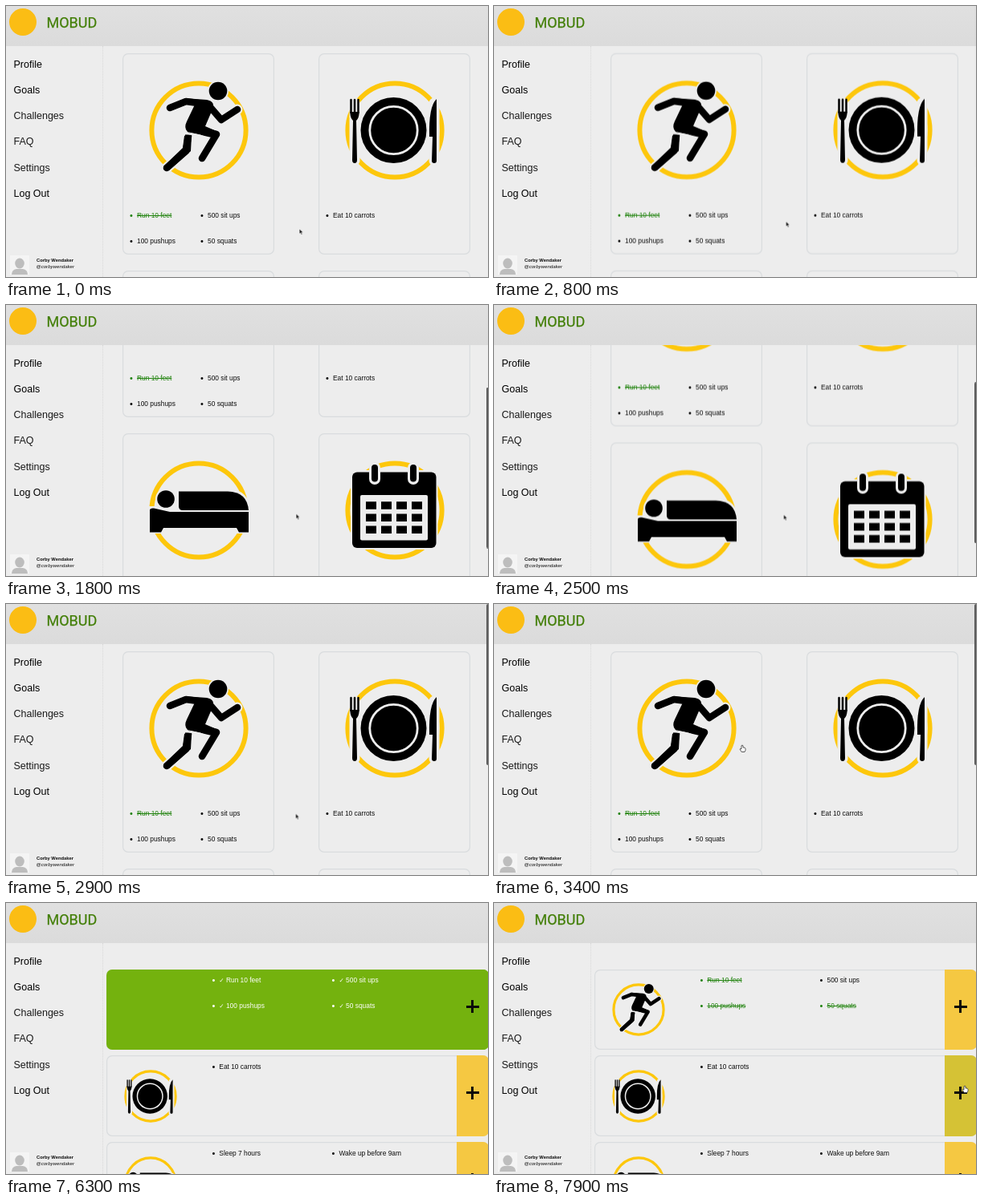
Animation, 600 px wide and 338 px high, one loop 8000 ms. Source, as an HTML page:

```html
<!DOCTYPE html>
<html lang="en">
<head>
<meta charset="utf-8">
<title>Goals</title>
<style>
  :root { --bg: #ededed; --ink: #0d0d0d; --done: #1f820c; --gold: #f5c842; --green: #74b20e; }
  html, body { margin: 0; width: 100%; height: 100%; overflow: hidden; background: var(--bg); }
  body { font-family: "Liberation Sans", Arial, sans-serif; color: var(--ink); }
  .stage { position: relative; width: 600px; height: 338px; overflow: hidden; background: var(--bg); }
  .stage * { position: absolute; white-space: nowrap; }
  svg { overflow: visible; }

  header { left: 0; top: 0; width: 600px; height: 49.5px; background: linear-gradient(#e0e0e0, #dbdbdb); }
  .logo { left: 4px; top: 3px; width: 34px; height: 34px; border-radius: 50%; background: #fbbd14; }
  .brand { left: 50.5px; top: 10px; font: 18px/21px Roboto, sans-serif; color: #437f08; -webkit-text-stroke: .25px; }
  nav { left: 0; top: 50px; width: 120px; height: 288px; border-right: 1px dotted #d8d8d8; }
  nav span { left: 9.5px; top: calc(14.5px + 32.3px * var(--i)); font-size: 12.5px; line-height: 16px; color: #1a1a1a; }
  nav .on { color: #000; }
  .avatar { left: 5px; top: 311px; }
  .user { left: 38px; top: 314px; font: bold 5.8px/7px "Liberation Sans", sans-serif; }
  .handle { left: 37.5px; top: 321px; font: italic 6.1px/7px "Liberation Sans", sans-serif; }

  .view { left: 0; top: 0; width: 600px; height: 338px; }
  .card { box-shadow: inset 0 0 0 1.2px #d9dcde; border-radius: 7px; overflow: hidden; }
  .grid .card { width: 189px; height: 251px; left: var(--x); top: var(--y); }
  .grid svg { left: 28.5px; top: 30px; width: 132px; height: 132px; }
  .list .card { left: 125px; width: 475.5px; height: 100.5px; top: calc(82.5px + 107.8px * var(--i)); }
  .list svg { left: 19.5px; top: 15.5px; width: 70px; height: 70px; }

  .item { font-size: 8.4px; line-height: 10px; left: 18px; top: 196.5px; }
  .item::before { content: "•"; position: absolute; left: -8.9px; top: 0; font-size: 11px; line-height: 10px; }
  .c2 { left: 106px; }
  .r2 { top: 229px; }
  .list .item { left: 140.3px; top: 8.5px; }
  .list .c2 { left: 289.5px; }
  .list .r2 { top: 40.5px; }
  .done, .soon { text-decoration: line-through; }
  .done { color: var(--done); }
  .soon { text-decoration-color: transparent; }
  .item b, .item i { position: static; display: inline-block; font: 8.4px/10px "DejaVu Sans", sans-serif; }
  .item b { color: #000; margin-left: 8px; }
  .item b + b { margin-left: 5.5px; }
  .item i { font-size: 7.5px; font-weight: bold; }

  .all { inset: 0; background: var(--green); color: #fff; opacity: 0; }
  .plus { right: 0; top: 0; width: 39.5px; height: 100%; background: var(--gold); }
  .plus::before, .plus::after { content: ""; position: absolute; background: #0a0a0a; }
  .plus::before { left: 11.5px; top: 45px; width: 16px; height: 3px; }
  .plus::after { left: 18px; top: 38.5px; width: 3px; height: 16px; }
  .bar { left: 597.5px; top: 0; width: 4px; height: 201px; border-radius: 2px; background: #5c5c5c; }
  .cursor { left: 0; top: 0; }

  .grid, .list, .page, .bar, .cursor, .arrow, .hand, .all, .plus, .soon, .mark { animation: 8s linear infinite; }
  .grid { animation-name: leave; }
  .list { animation-name: enter; }
  .page { animation-name: scroll; }
  .bar { animation-name: thumb, barShow; }
  .cursor { animation-name: move; }
  .arrow { animation-name: arrow; }
  .hand { animation-name: hand; }
  .all { animation-name: all; }
  .p1 { animation-name: glow1; }
  .p2 { animation-name: glow2; }
  .s1 { animation-name: strike1; }
  .s2 { animation-name: strike2; }
  .m1 { animation-name: mark1; }
  .m2 { animation-name: mark2; }
  .grid, .list, .arrow, .hand, .soon, .mark { animation-timing-function: step-end; }

  @keyframes leave { 0% { visibility: visible } 47.5%, 100% { visibility: hidden } }
  @keyframes enter { 0% { visibility: hidden } 47.5%, 100% { visibility: visible } }
  @keyframes scroll {
    0%, 10% { transform: translateY(0) }
    15% { transform: translateY(-127px) }
    18.75%, 28.75% { transform: translateY(-170px) }
    31.25% { transform: translateY(-159px) }
    36%, 100% { transform: translateY(0) }
  }
  @keyframes thumb {
    0%, 10% { transform: translateY(0) }
    15% { transform: translateY(75.5px) }
    18.75%, 28.75% { transform: translateY(102.5px) }
    31.25% { transform: translateY(96.5px) }
    36%, 100% { transform: translateY(0) }
  }
  @keyframes barShow { 0%, 10% { opacity: 0 } 11%, 44% { opacity: 1 } 47%, 100% { opacity: 0 } }
  @keyframes move {
    0%, 5% { transform: translate(365.3px, 278px) }
    15% { transform: translate(361.8px, 259.5px) }
    31.25%, 37% { transform: translate(360.6px, 261.5px) }
    42.5%, 47.5% { transform: translate(309px, 176px) }
    53.75% { transform: translate(302px, 127px) }
    57.5%, 59% { transform: translate(325px, 127px) }
    63.75% { transform: translate(451px, 127px) }
    66%, 67.5% { transform: translate(463px, 127px) }
    71.25%, 90% { transform: translate(581px, 126px) }
    97.5%, 100% { transform: translate(586px, 228px) }
  }
  @keyframes arrow {
    0% { opacity: 1 } 40% { opacity: 0 } 47.5% { opacity: 1 } 70% { opacity: 0 } 100% { opacity: 0 }
  }
  @keyframes hand {
    0% { opacity: 0 } 40% { opacity: 1 } 47.5% { opacity: 0 } 70% { opacity: 1 }
    73.75% { opacity: 0 } 91.25% { opacity: 1 } 100% { opacity: 1 }
  }
  @keyframes all { 0%, 72.5% { opacity: 0 } 75%, 88.75% { opacity: 1 } 91.25%, 100% { opacity: 0 } }
  @keyframes glow1 {
    0%, 70% { background: var(--gold) } 75%, 88.75% { background: var(--green) } 92.5%, 100% { background: var(--gold) }
  }
  @keyframes glow2 { 0%, 97.5% { background: var(--gold) } 100% { background: #b5bd28 } }
  @keyframes strike1 {
    0% { color: var(--ink); text-decoration-color: transparent }
    58.75%, 100% { color: var(--done); text-decoration-color: var(--done) }
  }
  @keyframes strike2 {
    0% { color: var(--ink); text-decoration-color: transparent }
    67.5%, 100% { color: var(--done); text-decoration-color: var(--done) }
  }
  @keyframes mark1 { 0% { opacity: 0 } 52.5% { opacity: 1 } 58.75%, 100% { opacity: 0 } }
  @keyframes mark2 { 0% { opacity: 0 } 62.5% { opacity: 1 } 67.5%, 100% { opacity: 0 } }
</style>
</head>
<body>
<svg width="0" height="0" style="position:absolute">
  <defs>
    <circle id="ring" r="58.600" fill="none" stroke="#fdc70c" stroke-width="6"/>
    <path id="limbs" fill="none" stroke-linecap="round" stroke-linejoin="round"
      d="M-36-28L-16-36L6-33M15-28L28-13L48-26M-8-2L22 5L4 35M-13 7L-16 26L-40 47"/>

    <symbol id="run" viewBox="-66 -66 132 132">
      <use href="#ring"/>
      <use href="#limbs" stroke="#ededed" stroke-width="13"/>
      <circle cx="24" cy="-49" r="13" fill="#ededed"/>
      <circle cx="24" cy="-49" r="11.3"/>
      <use href="#limbs" stroke="#000" stroke-width="8.6"/>
      <path d="M-18-40L10-38Q21-36 17-26L8-5L22 1L20 10L-14 2Q-19-3-15-11L-5-32Z"/>
      <path d="M-18 7L-9 7L-10 26L-37 50L-44 45L-20 22Z"/>
      <path d="M-22 4Q-4 4 8 9" fill="none" stroke="#ededed" stroke-width="2.4"/>
    </symbol>

    <symbol id="eat" viewBox="-66 -66 132 132">
      <use href="#ring"/>
      <path d="M-50-34V38M49-34V38" stroke="#ededed" stroke-width="13" stroke-linecap="round"/>
      <circle cx="-1.5" r="41"/>
      <circle cx="-1.5" r="29.7" fill="none" stroke="#ededed" stroke-width="2.8"/>
      <path d="M-54.5-38V-22M-50-38V-22M-45.5-38V-22" stroke="#000" stroke-width="2.5" stroke-linecap="round"/>
      <path d="M-55.7-23H-44.3Q-44.5-15-48-12L-47 37Q-47 41-50 41T-53 37L-52-12Q-55.5-15-55.7-23Z"/>
      <path d="M52-39V38Q52 41 49 41T46 38L47 8H43Q42-30 52-39Z"/>
    </symbol>

    <symbol id="sleep" viewBox="-66 -66 132 132">
      <use href="#ring"/>
      <path d="M-27-26H40Q62-25 64 0V29H47V24H-45L-47 29H-64V-5H-27Z" fill="#ededed"/>
      <circle cx="-41" cy="-14" r="13" fill="#ededed"/>
      <circle cx="-41" cy="-14" r="10.800"/>
      <path d="M-25-23.500H36Q60-23 62 0H-20Q-25 0-25-5Z"/>
      <path d="M-61 0Q-61-3-56-2.500L-36 2H62V27.500H50L47 22H-44L-47 27.500H-61Z"/>
    </symbol>

    <symbol id="plan" viewBox="-66 -66 132 132">
      <use href="#ring"/>
      <rect x="-55" y="-50" width="108.500" height="99" rx="8" fill="#ededed"/>
      <rect x="-53" y="-47.500" width="104.500" height="94.500" rx="6"/>
      <rect x="-43" y="-19" width="84" height="56.500" rx="2" fill="#ededed"/>
      <path d="M-25-53V-39M23-53V-39" stroke="#ededed" stroke-width="14" stroke-linecap="round"/>
      <path d="M-25-53V-39.500M23-53V-39.500" stroke="#000" stroke-width="8" stroke-linecap="round"/>
      <path d="M-36-6H35M-36 9.200H35M-36 24.200H35" stroke="#000" stroke-width="9.500" stroke-dasharray="13 6"/>
    </symbol>
  </defs>
</svg>

<div class="stage">
  <div class="view grid"><div class="view page">
    <div class="card" style="--x:145px;--y:59px">
      <svg><use href="#run"/></svg>
      <span class="item done">Run 10 feet</span><span class="item c2">500 sit ups</span>
      <span class="item r2">100 pushups</span><span class="item c2 r2">50 squats</span>
    </div>
    <div class="card" style="--x:389px;--y:59px">
      <svg><use href="#eat"/></svg>
      <span class="item">Eat 10 carrots</span>
    </div>
    <div class="card" style="--x:145px;--y:329.5px"><svg><use href="#sleep"/></svg></div>
    <div class="card" style="--x:389px;--y:329.5px"><svg><use href="#plan"/></svg></div>
  </div></div>

  <div class="view list">
    <div class="card" style="--i:0">
      <svg><use href="#run"/></svg>
      <span class="item done">Run 10 feet</span><span class="item c2">500 sit ups</span>
      <span class="item r2 soon s1">100 pushups<b class="mark m1">✔</b><b class="mark m1">✘</b></span>
      <span class="item c2 r2 soon s2">50 squats<b class="mark m2">✔</b><b class="mark m2">✘</b></span>
      <div class="all">
        <span class="item"><i>✓</i> Run 10 feet</span><span class="item c2"><i>✓</i> 500 sit ups</span>
        <span class="item r2"><i>✓</i> 100 pushups</span><span class="item c2 r2"><i>✓</i> 50 squats</span>
      </div>
      <div class="plus p1"></div>
    </div>
    <div class="card" style="--i:1">
      <svg><use href="#eat"/></svg>
      <span class="item">Eat 10 carrots</span>
      <div class="plus p2"></div>
    </div>
    <div class="card" style="--i:2">
      <svg><use href="#sleep"/></svg>
      <span class="item">Sleep 7 hours</span><span class="item c2">Wake up before 9am</span>
      <div class="plus"></div>
    </div>
  </div>

  <header><div class="logo"></div><span class="brand">MOBUD</span></header>
  <nav>
    <span class="on" style="--i:0">Profile</span><span class="on" style="--i:1">Goals</span>
    <span style="--i:2">Challenges</span><span style="--i:3">FAQ</span>
    <span style="--i:4">Settings</span><span class="on" style="--i:5">Log Out</span>
  </nav>
  <svg class="avatar" width="24" height="24">
    <rect width="24" height="24" fill="#f4f4f4"/>
    <path d="M2 24Q2 18 8 17H16Q22 18 22 24Z" fill="#bdbdbd"/>
    <ellipse cx="12" cy="10" rx="5.800" ry="6.500" fill="#bdbdbd"/>
  </svg>
  <span class="user">Corby Wendaker</span>
  <span class="handle">@corbywendaker</span>

  <div class="bar"></div>
  <div class="cursor">
    <svg class="arrow" width="6" height="9">
      <path d="M0 0V6.200L1.400 5L2.400 7.300L3.500 6.800L2.500 4.600H4.400Z" fill="#111" stroke="#fff" stroke-width=".5"/>
    </svg>
    <svg class="hand" width="8" height="9">
      <path d="M-1 5V.6Q0-.4 1 .6V3Q3.600 2.600 4 4.200V6.500L3 8.500H-.8L-3 5Q-2.600 3.600-1 5Z"
        fill="#fff" stroke="#333" stroke-width=".8"/>
    </svg>
  </div>
</div>
</body>
</html>
```
